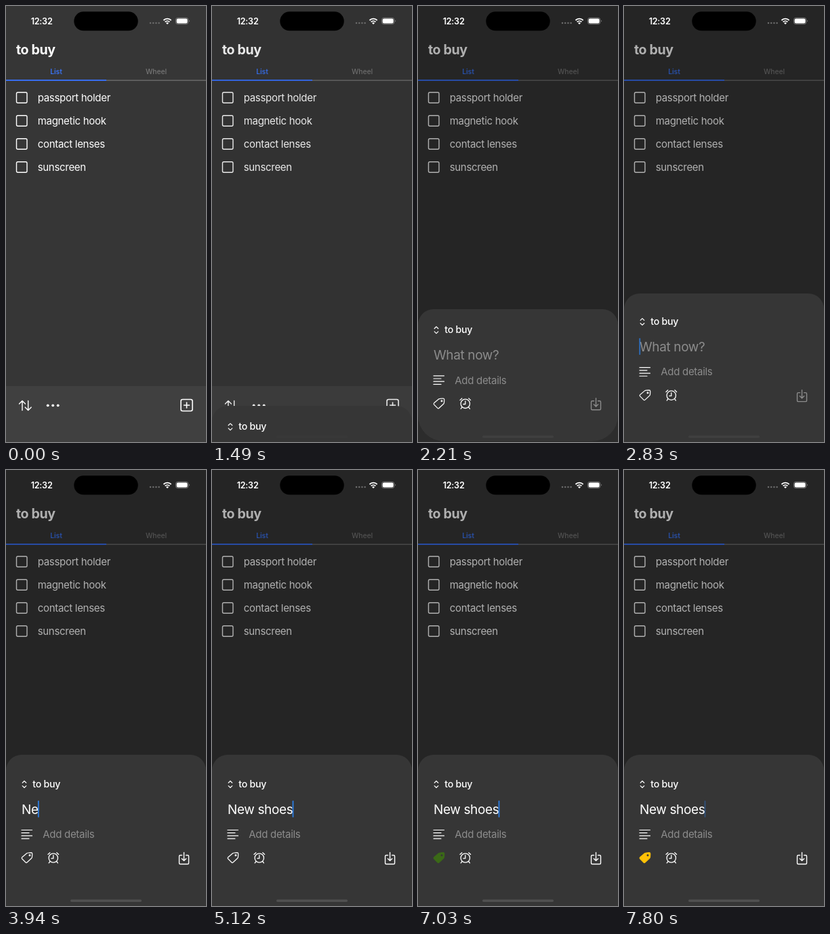
Write an HTML page that moves like this. It is 295 by 640 pixels and loops after 8 s.

```html
<!DOCTYPE html>
<html lang="en">
<head>
<meta charset="utf-8">
<title>to buy</title>
<style>
  html, body { margin: 0; width: 100%; height: 100%; overflow: hidden; background: #363636; }
  svg { display: block; width: 100vw; height: 100vh; font-family: Inter, Roboto, sans-serif; }
  text { fill: #fff; font-size: 15px; letter-spacing: -.02em; white-space: pre; }
  .line { fill: none; stroke: #fff; stroke-width: 1.4; stroke-linecap: round; stroke-linejoin: round; }
  .tab { font-size: 10.4px; font-weight: 500; letter-spacing: -.01em; text-anchor: middle; }
  .dot { fill: #fff; }
</style>
</head>
<body>
<svg viewBox="0 0 295 640">
  <rect width="295" height="640" fill="#363636"/>

  <!-- list screen -->
  <text x="15" y="71" style="font-size:19.6px;font-weight:700">to buy</text>
  <text class="tab" x="74" y="100" style="fill:#3a72f0;font-weight:600">List</text>
  <text class="tab" x="221.5" y="100" style="fill:#757575">Wheel</text>
  <rect y="108.5" x="148" width="147" height="1.3" fill="#707070"/>
  <rect y="108" width="148" height="2" fill="#386cec"/>
  <g id="list"></g>
  <rect y="558" width="295" height="82" fill="#404040"/>
  <g class="line">
    <path d="M24 593.5V579.5M19.5 584L24 579.5L28.5 584M32.7 579.5V593.5M28.2 589L32.7 593.5L37.2 589"/>
    <rect x="258" y="577.5" width="17" height="17" rx="2.5" stroke-width="1.6"/>
    <path d="M266.5 582V590M262.5 586H270.5" stroke-width="1.6"/>
  </g>
  <g class="dot">
    <circle cx="61.7" cy="586.3" r="1.9"/><circle cx="69.2" cy="586.3" r="1.9"/><circle cx="76.7" cy="586.3" r="1.9"/>
  </g>
  <rect id="dim" width="295" height="640"/>

  <!-- status bar -->
  <text x="36.7" y="26.5" style="font-size:12.6px;font-weight:600">12:32</text>
  <rect x="100.3" y="8.3" width="94.4" height="28" rx="14"/>
  <g fill="#6a6a6a">
    <circle cx="213" cy="25" r="1.3"/><circle cx="217.2" cy="25" r="1.3"/><circle cx="221.4" cy="25" r="1.3"/><circle cx="225.6" cy="25" r="1.3"/>
  </g>
  <g class="line" style="stroke-width:1.8;stroke-linecap:butt">
    <path d="M232.4 21A8 8 0 0 1 243.6 21M234.6 23.4A5 5 0 0 1 241.4 23.4"/>
  </g>
  <path class="dot" d="M236 24.9A3 3 0 0 1 240 24.9L238 27Z"/>
  <rect x="250.4" y="17.4" width="18.4" height="9.2" rx="3" fill="none" stroke="#8a8a8a" stroke-width=".8"/>
  <rect class="dot" x="251.6" y="18.6" width="16" height="6.8" rx="2"/>
  <path d="M270 20.4Q271.6 22 270 23.6Z" fill="#9a9a9a"/>

  <!-- new item sheet -->
  <path id="sheet" fill="#363636"/>
  <g id="form">
    <path class="line" d="M24.2 459.2L27 456.5L29.8 459.2M24.2 463.6L27 466.3L29.8 463.6" style="stroke-width:1.2"/>
    <text x="39.3" y="466" style="font-size:14.2px;font-weight:450">to buy</text>
    <text id="entry" x="23" y="504.8" style="font-size:19px"></text>
    <rect id="caret" y="485.3" width="1.8" height="24.6" rx=".9" fill="#2b7de4"/>
    <path class="line" d="M23 528.5H38.5M23 532.7H34M23 536.9H38.5M23 541.1H34" style="stroke-width:1.2"/>
    <text x="54.3" y="540.3" style="fill:#8c8c8c">Add details</text>
    <g id="tag" class="line" transform="translate(31 569)" style="stroke-width:1.2">
      <path id="tagBody" d="M1.5 -7L6 -7.3Q7.8 -7.3 7.8 -5.5L7.5 -1Q7.5 0 6.5 1L0 7Q-1 8 -2 7L-7.5 1.5Q-8.3 .5 -7.3 -.5L-.5 -6.3Q.3 -7 1.5 -7Z"/>
      <circle id="tagHole" cx="4" cy="-3.5" r=".9"/>
    </g>
    <g class="line" transform="translate(69.8 569.5)" style="stroke-width:1.3">
      <circle r="6.7"/>
      <path d="M0 -4V.7H-3M-7.8 -5.2L-5 -7.8M7.8 -5.2L5 -7.8M-4.8 5L-6.6 7.4M4.8 5L6.6 7.4"/>
    </g>
    <path id="save" class="line" d="M259.5 565.5H257Q255.5 565.5 255.5 567V577Q255.5 578.5 257 578.5H268Q269.5 578.5 269.5 577V567Q269.5 565.5 268 565.5H265.5M262.5 561.5V573.5M259.3 570.4L262.5 573.6L265.7 570.4"/>
  </g>
  <rect id="home" x="95" y="630.5" width="105" height="3.4" rx="1.7"/>
</svg>
<script>
const $ = id => document.getElementById(id);
const LOOP = 8000;
const GREEN = '#3c7312', AMBER = '#ffc107';

const TICKS = [0, 1490, 1600, 1720, 1830, 1940, 2210,
  2620, 2730, 2830, 2930, 3050, 3160, 3280, 3390, 3590, 3710,
  3940, 4060, 4160, 4590, 4730, 4890, 5120, 6230,
  6470, 6580, 6690, 6810, 6920, 7030, 7170, 7280, 7380, 7480, 7590, 7690, 7800];
const TYPED = [[0, ''], [3940, 'Ne'], [4060, 'New'], [4160, 'New '], [4590, 'New s'],
  [4730, 'New sh'], [4890, 'New sho'], [5120, 'New shoes']];
// time, fill, opacity
const TAG = [[0, '', 1], [6230, '', .5], [6470, GREEN, .6], [6580, GREEN, 1], [7030, GREEN, .85],
  [7170, GREEN, .4], [7280, AMBER, .6], [7380, AMBER, 1]];

$('list').innerHTML = ['passport holder', 'magnetic hook', 'contact lenses', 'sunscreen'].map((name, i) =>
  `<g transform="translate(0 ${i * 34})">
    <rect class="line" x="15.5" y="126.7" width="15.5" height="15.5" rx="2"/>
    <text x="46.7" y="140">${name}</text>
  </g>`).join('');

const latest = (keys, t) => keys.filter(k => k[0] <= t).pop();
const ramp = (t, a, b) => Math.min(1, Math.max(0, (t - a) / (b - a)));
// critically damped spring from 0 to 1
const spring = (t, start, rate) => {
  const x = Math.max(0, t - start) * rate;
  return 1 - (1 + x) * Math.exp(-x);
};
const set = (id, attrs) => {
  for (const k in attrs) $(id).setAttribute(k, attrs[k]);
};

// full-width panel with top corner radius r and bottom corner radius b
const panel = (y, height, r, b) =>
  `M0 ${y + r}a${r} ${r} 0 0 1 ${r} ${-r}H${295 - r}a${r} ${r} 0 0 1 ${r} ${r}
   V${y + height - b}a${b} ${b} 0 0 1 ${-b} ${b}H${b}a${b} ${b} 0 0 1 ${-b} ${-b}Z`;

function caretAlpha(t) {
  if (t < 3940) return ramp(t, 2560, 2900) - ramp(t, 3080, 3390) + ramp(t, 3540, 3710);
  if (t < 6230) return 1;
  const p = (t - 6130) % 1070;
  return 1 - ramp(p, 0, 300) + ramp(p, 500, 750);
}

function draw(time) {
  const t = TICKS.filter(k => k <= time).pop();
  const isOpen = t >= 1490, isRaised = t >= 2620;
  const open = isOpen ? spring(t, 1430, .017) : 0;
  const raise = isRaised ? spring(t, 2560, .0125) : 0;
  const slide = 195 * (1 - open);

  set('dim', { opacity: .31 * open });
  set('sheet', { d: panel(445 + slide - 27 * raise, isRaised ? 260 : 194, 23, isRaised ? 0 : 38) });
  set('form', { transform: `translate(0 ${slide + 14.3 * (1 - raise)})` });

  const typed = latest(TYPED, t)[1];
  const entry = $('entry');
  entry.textContent = typed || 'What now?';
  entry.style.fill = typed ? '#fff' : '#8c8c8c';
  set('caret', {
    x: typed ? 22.3 + entry.getComputedTextLength() : 22.4,
    opacity: caretAlpha(t)
  });
  $('save').style.stroke = typed ? '#fff' : '#8c8c8c';
  set('home', { fill: typed ? '#505050' : '#3f3f3f', opacity: open });

  const [, fill, alpha] = latest(TAG, t);
  set('tag', { opacity: alpha });
  $('tagBody').style.fill = fill || 'none';
  $('tagBody').style.stroke = fill || '#fff';
  $('tagHole').style.stroke = fill ? '#363636' : '#fff';
}

function frame() {
  draw(performance.now() % LOOP);
  requestAnimationFrame(frame);
}
frame();
</script>
</body>
</html>
```
